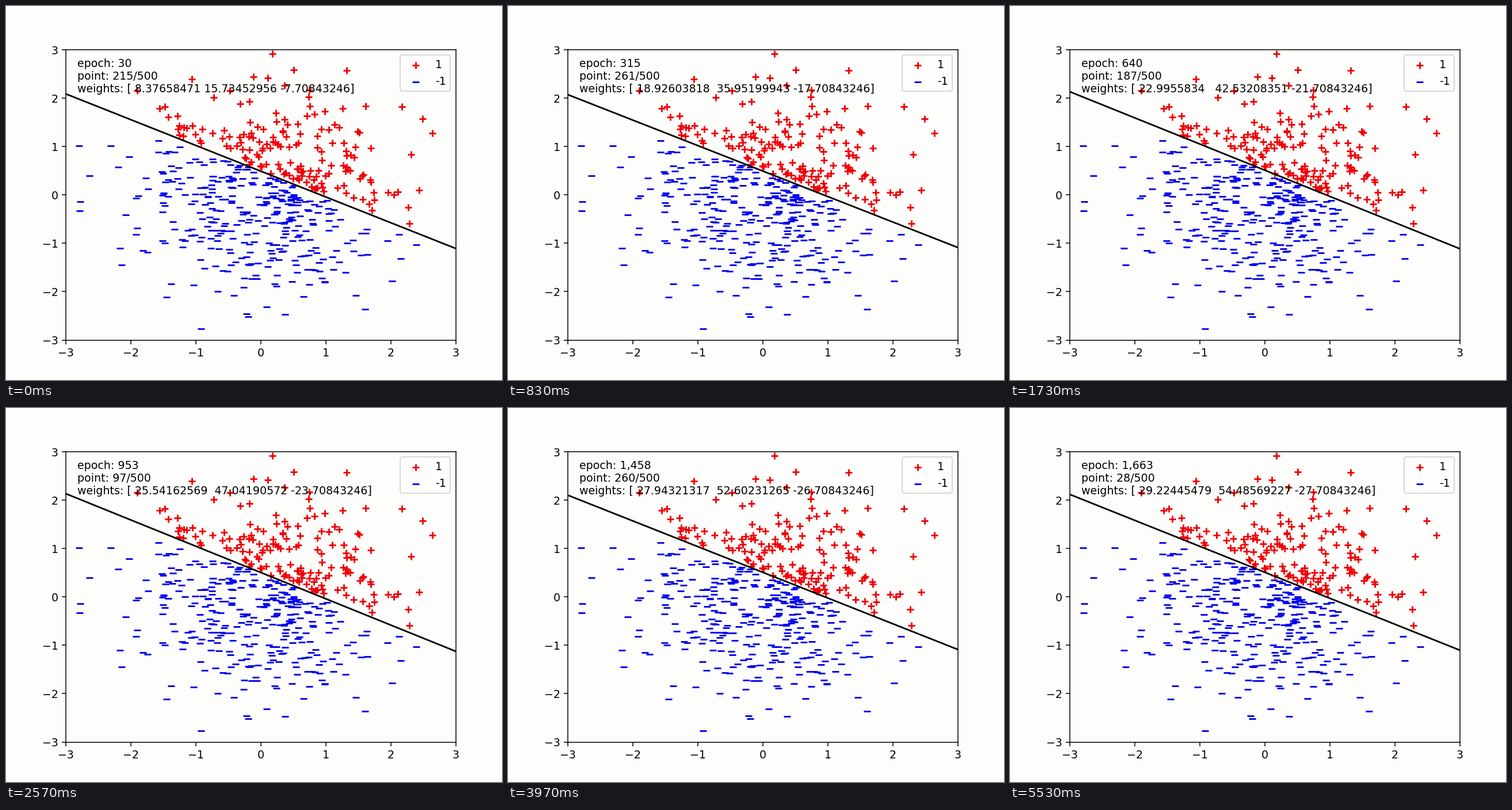
Recreate the animation shown at these times as a matplotlib script. Size 862x650 px, loop 5.56 s.

```python
import numpy as np
import matplotlib.pyplot as plt
from matplotlib.animation import FuncAnimation

W, H, DPI = 862, 650, 128
LOOP, N = 5560, 167
HOLD = 30  # still steps at the end
POINTS = 500
PAPER, RED, BLUE = "#fdfdfb", "#f00006", "#0000f0"
K = 136.5 / DPI  # scale of the default point sizes

plt.rcParams.update({
    "font.family": "DejaVu Sans",
    "font.size": 10 * K,
    "axes.linewidth": 0.8 * K,
    "axes.facecolor": PAPER,
    "lines.linewidth": 1.5 * K,
    "lines.markersize": 6 * K,
    "patch.linewidth": K,
})
for axis in ("xtick", "ytick"):
    plt.rcParams.update({
        f"{axis}.major.size": 3.5 * K,
        f"{axis}.major.width": 0.8 * K,
        f"{axis}.major.pad": 3.5 * K,
    })

# Training state at the start, after the fast first phase and at convergence
KEY_STEP = [0, 24, N - HOLD - 1]
KEY_SEEN = np.array([30, 315, 1663]) * POINTS + [215, 261, 28]
KEY_WEIGHTS = np.array([
    (8.37658471, 15.73452956, -7.70843246),
    (18.92603818, 35.95199943, -17.70843246),
    (29.22445479, 54.48569227, -27.70843246),
])


def make_points(rng):
    """Normal cloud split by a line, with a narrow gap along it."""
    xy = rng.standard_normal((2 * POINTS, 2))
    x, y = xy.T
    side = y - (0.5 - 0.53 * x)
    keep = (np.hypot(x, y) < 3) & (np.abs(side) > 0.02 + 0.03 * np.abs(x))
    xy, side = xy[keep][:POINTS], side[keep][:POINTS]
    return xy[side > 0], xy[side < 0]


def make_history(rng):
    """Visited points and weights at every step of the training."""
    step = np.arange(N)
    seen = np.interp(step, KEY_STEP, KEY_SEEN)
    # weights grow like the cube root of the visits
    w = np.column_stack([np.interp(np.cbrt(seen), np.cbrt(KEY_SEEN), col)
                         for col in KEY_WEIGHTS.T])
    noise = rng.normal(0, 0.3, (N, 2))
    noise[np.isin(step, KEY_STEP) | (step > KEY_STEP[-1])] = 0
    w[:, :2] += noise
    # the bias moves in whole units
    start = KEY_WEIGHTS[0, 2]
    w[:, 2] = start + np.round(w[:, 2] - start)
    return np.round(seen).astype(int), np.round(w, 8)


rng = np.random.default_rng(11)
red, blue = make_points(rng)
seen, weights = make_history(rng)

fig = plt.figure(figsize=(W / DPI, H / DPI), dpi=DPI, facecolor=PAPER)
ax = fig.add_axes([104 / W, 69.4 / H, 677.6 / W, 504.6 / H])
ax.scatter(*red.T, c=RED, marker="+", label="1")
ax.scatter(*blue.T, c=BLUE, marker="_", label="-1")
xs = np.array([-3, 3])
line, = ax.plot(xs, xs, "k")
info = ax.text(0.03, 0.97, "", transform=ax.transAxes, va="top")
ax.set(xlim=(-3, 3), ylim=(-3, 3), xticks=range(-3, 4), yticks=range(-3, 4))
ax.legend(loc="upper right")


def update(i):
    epoch, point = divmod(seen[i], POINTS)
    a, b, c = weights[i]
    line.set_ydata(-(a * xs + c) / b)
    info.set_text(f"epoch: {epoch:,}\npoint: {point}/{POINTS}\nweights: {weights[i]}")
    return line, info


anim = FuncAnimation(fig, update, frames=N, interval=LOOP / N, repeat=True, repeat_delay=0)
plt.show()
```
